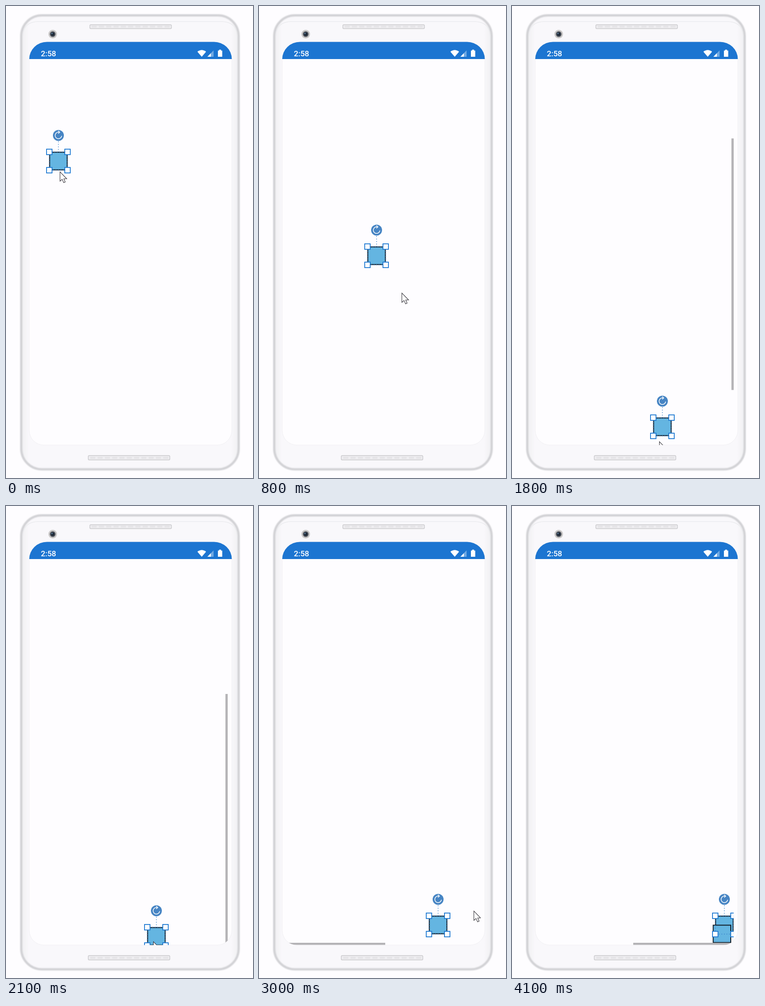
These frames come from a looping animation (542x1032 px, 4.2 s). An HTML page:

```html
<!DOCTYPE html>
<html lang="en">
<head>
<meta charset="utf-8">
<title>Dragging a shape</title>
<style>
html, body { margin: 0; width: 100%; height: 100%; overflow: hidden; background: #fefdff; }
svg { display: block; width: 542px; height: 1032px; }
text { font: 500 17px Roboto, sans-serif; fill: #fff; }
.handle { fill: #fff; stroke: #1c78d2; stroke-width: 1.8; }
.shape { fill: #64b5e1; stroke: #101a24; stroke-width: 2; }
.dots { fill: none; stroke: #3d86cc; stroke-width: 1.3; stroke-dasharray: 2 3.5; }
.bar { fill: #b4b3b6; }
</style>
</head>
<body>
<svg viewBox="0 0 542 1032">
  <defs>
    <linearGradient id="body">
      <stop offset="0" stop-color="#f0f0f2"/>
      <stop offset=".035" stop-color="#f9f8fb"/>
      <stop offset=".965" stop-color="#f9f8fb"/>
      <stop offset="1" stop-color="#f0f0f2"/>
    </linearGradient>
    <filter id="soft"><feGaussianBlur stdDeviation="1"/></filter>
    <path id="outline" d="M51 116 A39 37.500 0 0 1 90 78.500 H456 A39 37.500 0 0 1 495.500 116 V928 A32 32 0 0 1 463 960 H83 A32 32 0 0 1 51 928 Z"/>
    <clipPath id="screen"><use href="#outline"/></clipPath>
    <clipPath id="view"><rect x="51" y="116" width="435.5" height="844"/></clipPath>
    <rect id="handle" x="-6" y="-6" width="12" height="12"/>
  </defs>

  <rect x="33.500" y="20.500" width="477" height="992.500" rx="45" fill="url(#body)" stroke="#d2d2d5" stroke-width="5" filter="url(#soft)"/>
  <path d="M37 66 Q38 34 72 34 H472 Q506 34 507 66" fill="none" stroke="#ececef" stroke-width="1.5"/>
  <g fill="#eeedf0" stroke="#c9c9cc" stroke-width="1.4">
    <rect x="184" y="41" width="179" height="8.5" rx="2"/>
    <rect x="180.500" y="983" width="179" height="9.500" rx="2"/>
  </g>
  <path d="M188 45.300 H360 M185 988 H357" stroke="#e5e4e7" stroke-width="4" stroke-dasharray="11 5"/>
  <circle cx="102.500" cy="61.500" r="9.500" fill="#cbc9c8"/>
  <circle cx="102.500" cy="61.500" r="6.300" fill="#585c64"/>
  <circle cx="102.500" cy="61.500" r="4" fill="#1d2836"/>
  <circle cx="101" cy="60" r="1.600" fill="#5e7f9e"/>

  <use href="#outline" fill="#fefdff" stroke="#f1f0f3"/>
  <g clip-path="url(#screen)">
    <rect x="51" y="78" width="445" height="38" fill="#1c75d1"/>
    <text x="76.500" y="110">2:58</text>
    <g fill="#fff">
      <path d="M420 100 Q429.500 92.500 439 100 L429.500 111 Z"/>
      <path d="M442 111 L455.500 97 V111 Z" opacity=".38"/>
      <path d="M442 111 L449.500 103.200 V111 Z"/>
      <path d="M465 97.500 H467.500 V95.500 H472 V97.500 H474.500 V111 H465 Z"/>
    </g>
    <g clip-path="url(#view)">
      <g class="pos"><rect class="shape" x="-19.300" y="-19.300" width="38.600" height="38.600"/></g>
      <rect id="copy" class="shape" x="441.500" y="916.500" width="38.500" height="38"/>
      <g class="pos">
        <path class="dots" d="M0 -43 V-20 M-20 -20 H20 V20 H-20 Z"/>
        <circle cy="-56" r="12" fill="#4785c4"/>
        <path d="M7.200 -55.200 A7.200 7.200 0 1 1 1 -63.100 M-.5 -66.300 L3 -63.100 L-.5 -60" fill="none" stroke="#fff" stroke-width="1.500"/>
        <g class="handle">
          <use href="#handle" x="-20" y="-20"/>
          <use href="#handle" x="20" y="-20"/>
          <use href="#handle" x="-20" y="20"/>
          <use href="#handle" x="20" y="20"/>
        </g>
      </g>
      <path id="cursor" d="M.5 .5 V21 L5.200 16.800 L8.700 24.300 L12 22.800 L8.900 15.800 H15.300 Z" fill="#fff" stroke="#35333a" stroke-width="1.100"/>
    </g>
    <rect id="vbar" class="bar" x="481.500" width="5" height="550"/>
    <rect id="hbar" class="bar" y="955" width="226" height="4.500"/>
  </g>
</svg>
<script>
const LOOP = 4200, STEP = 100;

// Key points of each drag: [time, x, y]
const shapePath = [
  [200, 115, 339], [600, 149, 390], [800, 258, 546], [1200, 403, 715],
  [1800, 330, 920], [2000, 330, 941], [2400, 330, 941], [3000, 393, 916], [3400, 466, 916]
];
const cursorPath = [
  [200, 118, 362], [600, 210, 493], [800, 313, 627], [1050, 405, 745],
  [1200, 361, 792], [1700, 323, 952], [2200, 323, 952], [3000, 471, 885], [3800, 490, 885]
];

const $ = id => document.getElementById(id);
const clamp = v => Math.max(0, Math.min(1, v));
const show = (el, on) => el.setAttribute("visibility", on ? "visible" : "hidden");

// Slope at a key point: harmonic mean of its neighbours, flat at turns and ends
function slope(path, i, axis) {
  if (!path[i - 1] || !path[i + 1]) return 0;
  const rate = j => (path[j + 1][axis] - path[j][axis]) / (path[j + 1][0] - path[j][0]);
  const a = rate(i - 1), b = rate(i);
  return a * b > 0 ? 2 * a * b / (a + b) : 0;
}

// Smooth curve through the key points without overshoot
function along(path, t, axis) {
  const last = path.length - 1;
  t = Math.max(path[0][0], Math.min(path[last][0], t));
  const i = Math.max(1, path.findIndex(p => p[0] >= t));
  const a = path[i - 1], b = path[i], span = b[0] - a[0], k = (t - a[0]) / span;
  const ease = k * k * (3 - 2 * k);
  return a[axis] + (b[axis] - a[axis]) * ease
    + span * k * (1 - k) * ((1 - k) * slope(path, i - 1, axis) - k * slope(path, i, axis));
}

function place(el, path, t) {
  el.setAttribute("transform", `translate(${along(path, t, 1)} ${along(path, t, 2)})`);
}

function draw(now) {
  const t = Math.floor(now % LOOP / STEP) * STEP;
  document.querySelectorAll(".pos").forEach(el => place(el, shapePath, t));
  place($("cursor"), cursorPath, t);
  $("vbar").setAttribute("y", 116 + 295 * clamp((t - 1500) / 510));
  $("hbar").setAttribute("x", 51 + 215 * clamp((t - 3000) / 1000));
  show($("vbar"), t >= 1500 && t < 2600);
  show($("hbar"), t >= 2800);
  show($("copy"), t >= 3800);
}

function frame(now) {
  draw(now);
  requestAnimationFrame(frame);
}
draw(0);
requestAnimationFrame(frame);
</script>
</body>
</html>
```
